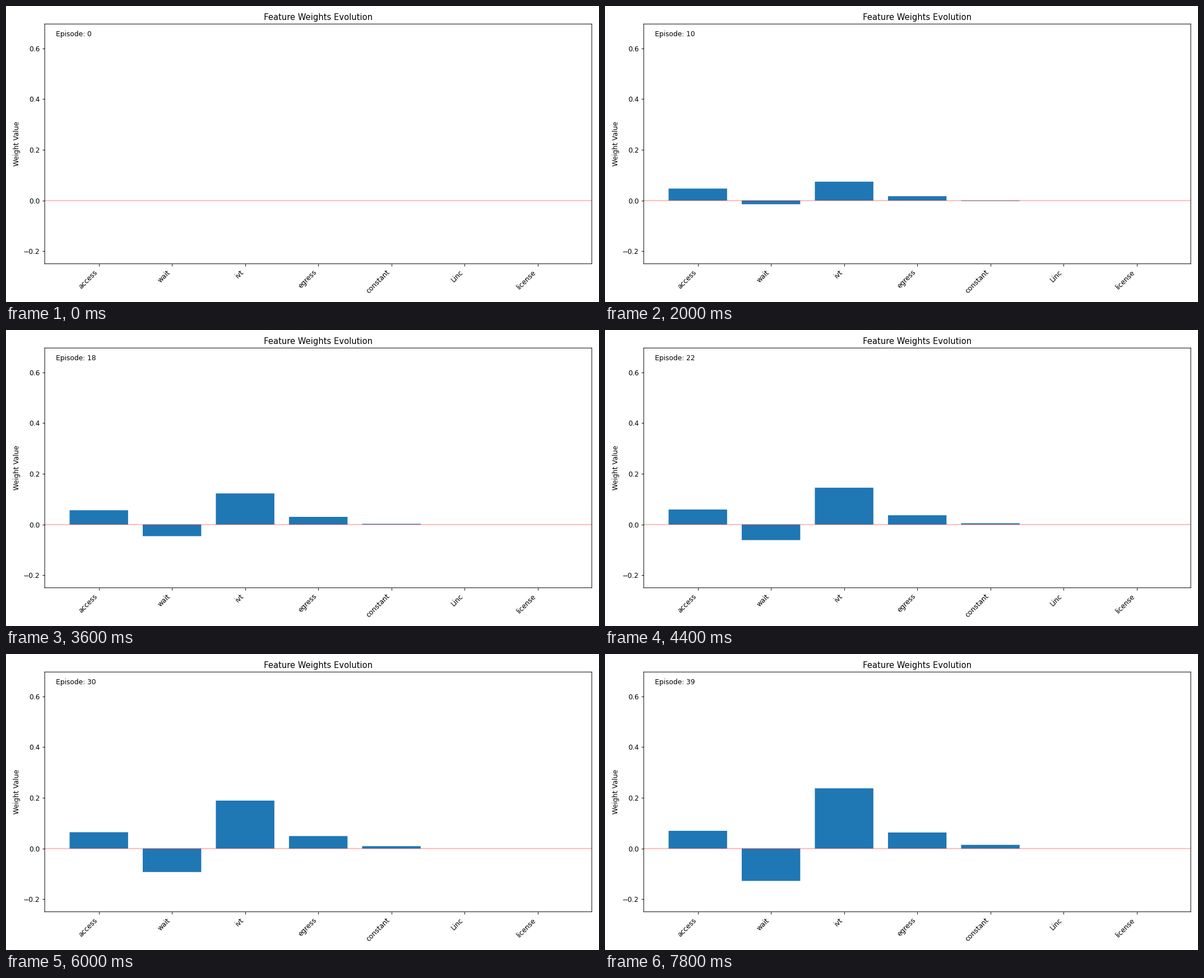
These frames come from a looping animation (1058x529 px, 8000 ms). A matplotlib script:

```python
import math

import matplotlib.pyplot as plt
from matplotlib.animation import FuncAnimation

W, H, DPI = 1058, 529, 88.1667
EPISODES, INTERVAL = 40, 200

# Feature: (drift per episode, early jump, episodes the jump takes to settle)
FEATURES = {
    "access": (0.0006, 0.0465, 4.6),
    "wait": (-0.0039, 0.0245, 1.7),
    "ivt": (0.0053, 0.031, 8.5),
    "egress": (0.00155, 0.003, 12),
    "constant": (0.00056, -0.0073, 0.7),
    "Linc": (0, 0, 1),
    "license": (0, 0, 1),
}


def weight(episode, drift, jump, settle):
    return drift * episode + jump * (1 - math.exp(-episode / settle))


plt.rcParams["font.family"] = "DejaVu Sans"
plt.rcParams["path.snap"] = False  # keep sub-pixel edges
fig = plt.figure(figsize=(12, 6), dpi=DPI, facecolor="white")

left, right, top, bottom = 69.1, 1045.1, 32.2, 460.7
ax = fig.add_axes([left / W, 1 - bottom / H, (right - left) / W, (bottom - top) / H])

slots = range(len(FEATURES))
bars = ax.bar(slots, [0] * len(FEATURES), width=0.8, color="#1f77b4")
ax.axhline(0, color="r", alpha=0.3)
ax.set_xlim(-0.74, 6.74)
ax.set_ylim(-0.2493, 0.696)
ax.set_yticks([-0.2, 0.0, 0.2, 0.4, 0.6])
ax.set_xticks(slots, list(FEATURES), rotation=45, ha="right")
ax.set_ylabel("Weight Value")
ax.set_title("Feature Weights Evolution")
label = ax.text(0.02, 0.95, "", transform=ax.transAxes)


def update(episode):
    for bar, params in zip(bars, FEATURES.values()):
        bar.set_height(weight(episode, *params))
    label.set_text(f"Episode: {episode}")
    return [*bars, label]


anim = FuncAnimation(fig, update, frames=EPISODES, interval=INTERVAL,
                     repeat=True, repeat_delay=0, blit=False)
plt.show()
```
